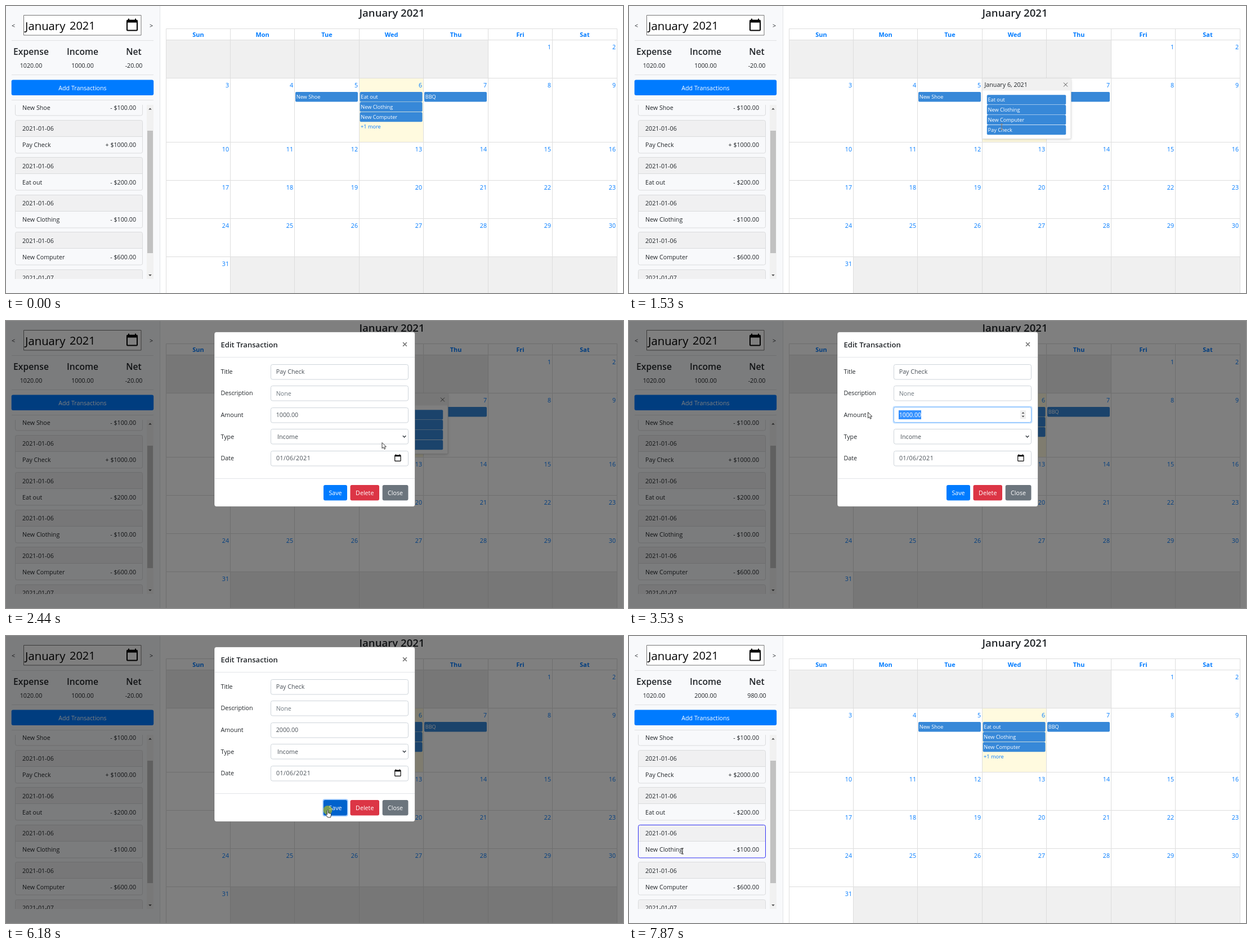
These frames come from a looping animation (1096 by 511 pixels, 8000 ms). An HTML page with a canvas:

```html
<!DOCTYPE html>
<html lang="en">
<head>
<meta charset="utf-8">
<title>Budget calendar</title>
<style>
html, body { margin: 0; width: 100%; height: 100%; overflow: hidden; background: #fff; }
canvas { display: block; }
</style>
</head>
<body>
<canvas id="stage" width="1096" height="511"></canvas>
<script>
const ctx = document.getElementById('stage').getContext('2d');
const LOOP = 8000, BASE = 10.7, SMALL = 9.2;
const INK = '#212529', BLUE = '#007bff', EVENT = '#3788d8', LINE = '#dddddd';

// Timeline in ms
const T = { popover: 1450, modal: 2330, press: 2990, blur: 6100, close: 6260, update: 6340 };
const KEYS = [3840, 4070, 4240, 4390, 4540, 4710, 4860];
const CLICKS = [[1360, 1530], [2290, 2370], [T.press, 3460], [T.blur, T.close]];
const PATH = [[280, 665, 6], [1060, 663, 215], [1450, 662, 215], [1840, 662, 215], [1980, 669, 216],
  [2440, 668, 216.5], [2600, 668, 216.5], [3000, 526, 167], [3380, 436, 166], [3530, 424.5, 162.5],
  [5410, 424.5, 162.5], [6100, 571.5, 310], [6260, 571.5, 310], [6410, 638, 316], [6720, 638, 316],
  [7110, 90, 230], [7490, 103, 350], [7870, 95, 383]];
const POINTERS = [[280, 'arrow'], [1000, 'hand'], [1450, 'beam'], [2370, 'arrow'], [2850, 'beam'],
  [3220, 'arrow'], [6030, 'hand'], [6260, 'arrow'], [7490, 'beam']];

const SHAPES = {
  arrow: new Path2D('M0 0V10.3L2.4 8.1 4 11.8 5.8 11 4.3 7.5H7.4Z'),
  hand: new Path2D('M-1 .8Q0-.8 1 .8V5L5.5 6.2Q6.5 6.6 6.2 8L5 13H0L-3.2 8.4Q-3.4 6.9-1 8Z'),
  calendar: new Path2D('M20 3h-1V1h-2v2H7V1H5v2H4c-1.1 0-2 .9-2 2v16c0 1.1.9 2 2 2h16c1.1 0 2-.9 2-2V5c0-1.1-.9-2-2-2zM20 21H4V8h16z')
};

const clamp = (v, lo, hi) => Math.max(lo, Math.min(hi, v));

function cursorAt(t) {
  const next = PATH.findIndex(k => k[0] > t);
  if (next < 1) return PATH.at(next).slice(1);
  const [t0, x0, y0] = PATH[next - 1], [t1, x1, y1] = PATH[next];
  const u = (t - t0) / (t1 - t0), e = u * u * (3 - 2 * u);
  return [x0 + (x1 - x0) * e, y0 + (y1 - y0) * e];
}

// y is the middle of the capitals
function text(s, x, y, { size = BASE, color = INK, align = 'left', weight = 400 } = {}) {
  ctx.font = `${weight} ${size}px "Open Sans", "Noto Sans", sans-serif`;
  ctx.textAlign = align;
  ctx.fillStyle = color;
  ctx.fillText(s, x, y + size * 0.36);
}

function box(x, y, w, h, fill, stroke, radius = 0) {
  ctx.beginPath();
  ctx.roundRect(x, y, w, h, radius);
  if (fill) { ctx.fillStyle = fill; ctx.fill(); }
  if (stroke) { ctx.strokeStyle = stroke; ctx.lineWidth = 1; ctx.stroke(); }
}

function poly(points, color, width) {
  ctx.beginPath();
  points.forEach(p => ctx.lineTo(...p));
  if (width) { ctx.strokeStyle = color; ctx.lineWidth = width; ctx.stroke(); }
  else { ctx.fillStyle = color; ctx.fill(); }
}

const triangle = (x, y, r, dir, color) =>
  poly([[x - r, y + dir * r / 2], [x + r, y + dir * r / 2], [x, y - dir * r / 2]], color);
const rule = (x0, x1, y, color) => box(x0, y, x1 - x0, 1, color);

function cross(x, y, r, color, width) {
  poly([[x - r, y - r], [x + r, y + r]], color, width);
  poly([[x - r, y + r], [x + r, y - r]], color, width);
}

function shape(name, x, y, scale, fill, stroke) {
  ctx.save();
  ctx.translate(x, y);
  ctx.scale(scale, scale);
  ctx.fillStyle = fill;
  ctx.fill(SHAPES[name], 'evenodd');
  if (stroke) { ctx.strokeStyle = stroke; ctx.lineWidth = 0.9; ctx.stroke(SHAPES[name]); }
  ctx.restore();
}

function sidebar(t, [cx, cy]) {
  const updated = t >= T.update;
  box(0, 0, 273, 511, '#f8f9fb');
  box(273, 0, 1, 511, '#e2e4e7');
  text('<', 13, 35, { align: 'center' });
  text('>', 258, 35, { align: 'center' });
  box(31.5, 16.5, 208.5, 35.5, '#fff', '#767676');
  text('January', 34, 35.2, { size: 20.3, color: '#000' });
  text('2021', 113, 35.2, { size: 20, color: '#000' });
  shape('calendar', 212, 21.5, 1, '#000');
  for (const y of [61, 122, 167]) rule(10, 262, y, '#e0e1e3');
  [['Expense', '1020.00', 44.5], ['Income', updated ? '2000.00' : '1000.00', 136],
    ['Net', updated ? '980.00' : '-20.00', 227]].forEach(([name, value, x]) => {
    text(name, x, 81.6, { size: 15.7, align: 'center', weight: 600 });
    text(value, x, 106, { align: 'center' });
  });
  box(9.7, 131.5, 252.5, 27.5, BLUE, null, 3);
  text('Add Transactions', 136, 146, { color: '#fff', align: 'center' });

  ctx.save();
  ctx.beginPath();
  ctx.rect(10, 176, 252, 310);
  ctx.clip();
  [['05', 'New Shoe', '- $100.00'], ['06', 'Pay Check', updated ? '+ $2000.00' : '+ $1000.00'],
    ['06', 'Eat out', '- $200.00'], ['06', 'New Clothing', '- $100.00'],
    ['06', 'New Computer', '- $600.00'], ['07', 'BBQ', '- $20.00']].forEach(([day, name, sum], i) => {
    const y = 136.7 + 66.5 * i, top = Math.floor(y) + 0.5;
    const hover = t > 6720 && cx > 16 && cx < 243 && cy > top && cy < top + 59;
    box(16.5, top, 226, 29, '#f0f0f1', null, [3, 3, 0, 0]);
    rule(17, 242, top + 28.5, '#dadbdd');
    box(16.5, top, 226, 58.5, null, hover ? '#3030f4' : '#dadbdd', 3);
    text('2021-01-' + day, 29, y + 15);
    text(name, 29, y + 44.2);
    text(sum, 231, y + 44.2, { align: 'right' });
  });
  box(250, 176, 12, 310, '#f1f1f1');
  box(251, 222, 10, 218, '#c1c1c1');
  triangle(256, 183, 2.8, 1, '#505050');
  triangle(256, 479.5, 2.8, -1, '#505050');
  ctx.restore();
}

function eventBar(name, x, y, w) {
  box(x, y - 8.6, w, 17.3, EVENT, null, 2);
  text(name, x + 1.7, y, { size: SMALL, color: '#fff' });
}

function calendar(t, pointer) {
  const col = i => Math.floor(284 + 114.45 * i) + 0.5;
  const rows = [60.5, 128.5, 242.5, 310.5, 378.5, 446.5, 514.5];
  text('January 2021', 685.5, 12, { size: 18.6, align: 'center', weight: 600 });
  ['Sun', 'Mon', 'Tue', 'Wed', 'Thu', 'Fri', 'Sat'].forEach((name, c) => {
    const x = col(c), right = col(c + 1);
    box(x, 40.5, right - x, 20, '#fff', LINE);
    text(name, (x + right) / 2, 51.3, { size: 10.9, color: BLUE, align: 'center', weight: 700 });
    for (let r = 0; r < 6; r++) {
      const day = r * 7 + c - 4, inside = day >= 1 && day <= 31;
      box(x, rows[r], right - x, rows[r + 1] - rows[r],
        !inside ? '#f0f0f0' : day === 6 ? '#fffadf' : '#fff', LINE);
      if (inside) text(day, right - 2.5, rows[r] + 12.4, { color: BLUE, align: 'right' });
    }
  });
  eventBar('New Shoe', 514, 161.7, 111);
  ['Eat out', 'New Clothing', 'New Computer'].forEach((n, i) => eventBar(n, 628.6, 161.7 + 17.9 * i, 111));
  eventBar('BBQ', 743, 161.7, 111);
  text('+1 more', 630, 215, { size: SMALL, color: BLUE });
  if (pointer === 'hand' && t < T.popover) rule(630, 667, 220, BLUE);
}

function popover() {
  ctx.save();
  ctx.shadowColor = 'rgba(0,0,0,.2)';
  ctx.shadowBlur = 5;
  ctx.shadowOffsetY = 1;
  box(627.5, 128.5, 157.5, 108, '#fff');
  ctx.restore();
  box(627.5, 128.5, 157.5, 108, null, LINE);
  box(628, 129, 157, 21.5, '#f0f0f0');
  text('January 6, 2021', 631.5, 140.3);
  cross(775.5, 140, 3.5, '#555', 1);
  ['Eat out', 'New Clothing', 'New Computer', 'Pay Check'].forEach((n, i) => eventBar(n, 635.8, 166.8 + 17.9 * i, 140.4));
}

function amountField(t, cx) {
  const focused = t >= T.press && t < T.blur;
  const typed = KEYS.filter(k => t >= k).length;
  const value = typed ? '2000.00'.slice(0, typed) : '1000.00';
  if (focused) {
    box(468.5, 151.5, 248, 31, '#bfdeff', null, 4);
    box(470.5, 153.5, 244, 27, '#fff', '#80bdff', 3);
    box(695, 159, 10, 15.5, '#efefef');
    triangle(700, 163.5, 2.5, 1, '#444');
    triangle(700, 170, 2.5, -1, '#444');
  }
  text(value, 479.7, 167.3, { color: '#495057' });
  if (!focused) return;
  if (typed) {
    const caretOn = Math.floor(Math.max(0, t - KEYS[6]) / 530) % 2 === 0;
    if (caretOn) box(Math.round(479.7 + ctx.measureText(value).width), 159, 1, 16, '#495057');
    return;
  }
  const left = t > 3380 ? 479 : clamp(cx, 479, 519);
  ctx.save();
  ctx.beginPath();
  ctx.rect(left, 159, 519 - left, 16);
  ctx.clip();
  box(479, 159, 40, 16, '#3390ff');
  text(value, 479.7, 167.3, { color: '#fff' });
  ctx.restore();
}

function modal(t, cx) {
  const shown = clamp((t - T.modal) / 100, 0, 1);
  box(0, 0, 1096, 511, `rgba(0,0,0,${0.5 * shown})`);
  ctx.save();
  ctx.globalAlpha = shown;
  ctx.translate(0, -36 * (1 - shown));
  box(370, 19.5, 356.5, 311, '#fff', 'rgba(0,0,0,.25)', 4);
  text('Edit Transaction', 381.5, 42.5, { size: 13.1, weight: 600 });
  cross(708.5, 41.5, 3.4, '#7b7b7b', 1.6);
  rule(370.5, 726, 64, '#e2e5e8');
  rule(370.5, 726, 280, '#e2e5e8');
  ['Title', 'Description', 'Amount', 'Type', 'Date'].forEach((label, i) => {
    const y = 90 + 38.55 * i;
    text(label, 381.5, y);
    box(470.5, Math.round(y - 13.5) + 0.5, 244, 26.5, '#fff', '#ced4da', 3);
  });
  text('Pay Check', 479.7, 90.3, { color: '#495057' });
  text('None', 479.7, 128.8, { color: '#6c757d' });
  amountField(t, cx);
  text('Income', 482, 206, { color: '#495057' });
  poly([[704.8, 204.2], [707.6, 207], [710.4, 204.2]], '#343a40', 1.4);
  ctx.letterSpacing = '.45px';
  text('01/06/2021', 480, 244.3, { color: '#495057' });
  ctx.letterSpacing = '0px';
  shape('calendar', 689, 236.7, 0.575, '#000');
  const pressed = t >= T.blur;
  if (pressed) box(562.3, 290.3, 45.4, 31, '#9fcaff', null, 4);
  [['Save', 564, 42, pressed ? '#0062cc' : BLUE], ['Delete', 611.5, 51.5, '#dc3545'],
    ['Close', 668.7, 45.8, '#6c757d']].forEach(([name, x, w, color]) => {
    box(x, 292, w, 27.5, color, null, 3);
    text(name, x + w / 2, 306.3, { color: '#fff', align: 'center' });
  });
  ctx.restore();
}

function drawPointer(t, kind, [x, y]) {
  if (CLICKS.some(([a, b]) => t >= a && t < b)) {
    ctx.beginPath();
    ctx.arc(x, y, 8, 0, 7);
    ctx.fillStyle = 'rgba(205,200,0,.58)';
    ctx.fill();
  }
  if (kind === 'beam') {
    const color = t < T.modal ? '#8a7260' : '#333';
    poly([[x, y - 5], [x, y + 5]], color, 1);
    for (const dy of [-5, 5]) poly([[x - 2, y + dy], [x + 2, y + dy]], color, 1);
  } else if (kind) {
    shape(kind, x, y, 1, '#fff', '#222');
  }
}

function draw(now) {
  const t = now % LOOP;
  const cursor = cursorAt(t);
  const pointer = POINTERS.filter(p => t >= p[0]).at(-1)?.[1];
  box(0, 0, 1096, 511, '#fff');
  sidebar(t, cursor);
  calendar(t, pointer);
  if (t >= T.popover && t < T.press) popover();
  if (t >= T.modal && t < T.close) modal(t, cursor[0]);
  drawPointer(t, pointer, cursor);
}

const start = performance.now();
function tick() {
  draw(performance.now() - start);
  requestAnimationFrame(tick);
}
tick();
</script>
</body>
</html>
```
